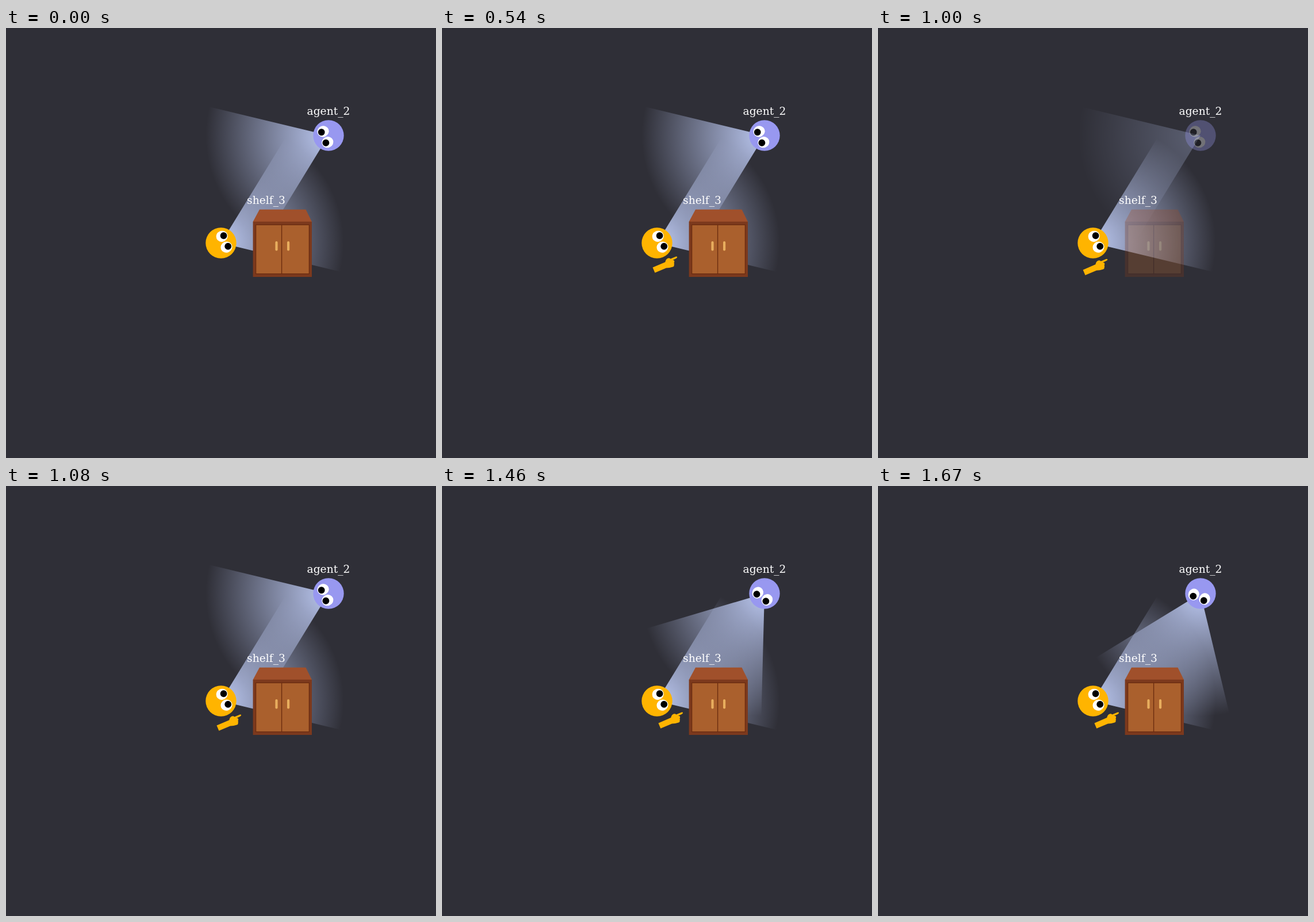
An HTML page for the animation above (1790 ms loop, 748 px wide and 748 px high).

```html
<!DOCTYPE html>
<html lang="en">
<head>
<meta charset="utf-8">
<title>Pointing agents</title>
<style>
  html, body { margin: 0; width: 100%; height: 100%; overflow: hidden; background: #2f2f37; }
  svg { display: block; width: 100vw; height: 100vh; }
  text { font: 18.7px "DejaVu Serif", "Noto Serif", serif; fill: #fff; text-anchor: middle; }
</style>
</head>
<body>
<svg viewBox="0 0 748 748">
  <defs>
    <radialGradient id="light" gradientUnits="userSpaceOnUse" cx="0" cy="0" r="213.7">
      <stop offset="0" stop-color="#bbc8f1"/>
      <stop offset="1" stop-color="#bbc8f1" stop-opacity="0"/>
    </radialGradient>
    <path id="cone" fill="url(#light)"/>
    <g id="eyes">
      <g fill="#fff">
        <ellipse cx="6" cy="-10.2" rx="10.2" ry="9.5"/>
        <ellipse cx="6" cy="10.2" rx="10.2" ry="9.5"/>
      </g>
      <circle cx="9.1" cy="-10" r="5.9"/>
      <circle cx="9.1" cy="10" r="5.9"/>
    </g>
  </defs>

  <g transform="translate(374 374) rotate(-22.5)"><use href="#cone"/></g>
  <g class="dim" transform="translate(561 187)"><use class="turn" href="#cone"/></g>

  <g class="dim">
    <path d="M441 315.7H521.5L532 337H429.6Z" fill="#a0502b"/>
    <rect x="429.6" y="336.8" width="102.4" height="96.2" fill="#7c391d"/>
    <g fill="#aa602d" stroke="#6a2b10" stroke-width="1.3">
      <rect x="434.6" y="342.4" width="45" height="85.2"/>
      <rect x="479.6" y="342.4" width="47.8" height="85.2"/>
    </g>
    <g fill="#e8ae5e">
      <rect x="468.4" y="371" width="4.2" height="16.4" rx="2"/>
      <rect x="489" y="371" width="4.2" height="16.4" rx="2"/>
    </g>
  </g>

  <g transform="translate(374 374) rotate(-22.5)">
    <circle r="26.7" fill="#ffb400"/>
    <use href="#eyes"/>
  </g>
  <g class="dim" transform="translate(561 187)">
    <circle r="26.7" fill="#9898f0"/>
    <use class="turn" href="#eyes"/>
  </g>

  <path id="hand" fill="#ffb400" d="M366.5 416.6L388.3 407.2Q389.3 402.5 392 401Q395 399.2 397.5 401.6L406.5 397.8Q408.8 397.2 409.2 398.6Q409.2 400 407 401L400.8 403.9Q404.2 403.6 404.2 406Q404.4 407.6 403.4 408.4Q404.8 410 403.6 412Q404.2 414.8 401.6 415.6Q396 417.6 390 417.6L370.4 425.8Z"/>

  <text x="561" y="151.3">agent_2</text>
  <text x="452.5" y="306.3">shelf_3</text>
</svg>
<script>
const LOOP = 1790, FPS = 24, REACH = 213.7, HALF = 36;
const all = sel => document.querySelectorAll(sel);
const hand = document.getElementById('hand');

const rad = HALF * Math.PI / 180;
const ex = REACH * Math.cos(rad), ey = REACH * Math.sin(rad);
document.getElementById('cone').setAttribute('d',
  `M0 0L${ex} ${-ey}A${REACH} ${REACH} 0 0 1 ${ex} ${ey}Z`);

// Hand pokes: forward (+), rest (0), back (-), one mark per tick
const pokes = [
  [3, '0+0-00+0--0'],
  [16, '0+0-00+0--0'],
  [29, '0+0-00+0-00+']
];

function poke(tick) {
  let side = 0;
  for (const [first, marks] of pokes) {
    if (tick < first) break;
    const mark = marks[Math.min(tick - first, marks.length - 1)];
    side = mark === '+' ? 1 : mark === '-' ? -1 : 0;
  }
  return side;
}

function draw(ms) {
  const t = Math.floor((ms % LOOP) / 10) * 10;
  const tick = Math.floor((t + 4.9) * FPS / 1000);
  const side = poke(tick);
  const turns = tick < 29 ? 0 : Math.min(3, 1 + Math.floor((tick - 29) / 5));
  const faded = tick >= 16 && tick < 26;

  hand.style.display = tick < 3 ? 'none' : '';
  hand.setAttribute('transform', `translate(${side * 9.9} ${side * -4.1})`);
  all('.turn').forEach(el => el.setAttribute('transform', `rotate(${157.5 - 15 * turns})`));
  all('.dim').forEach(el => el.setAttribute('opacity', faded ? 0.32 : 1));
}

const start = performance.now();
function loop() {
  draw(performance.now() - start);
  requestAnimationFrame(loop);
}
draw(0);
requestAnimationFrame(loop);
</script>
</body>
</html>
```
